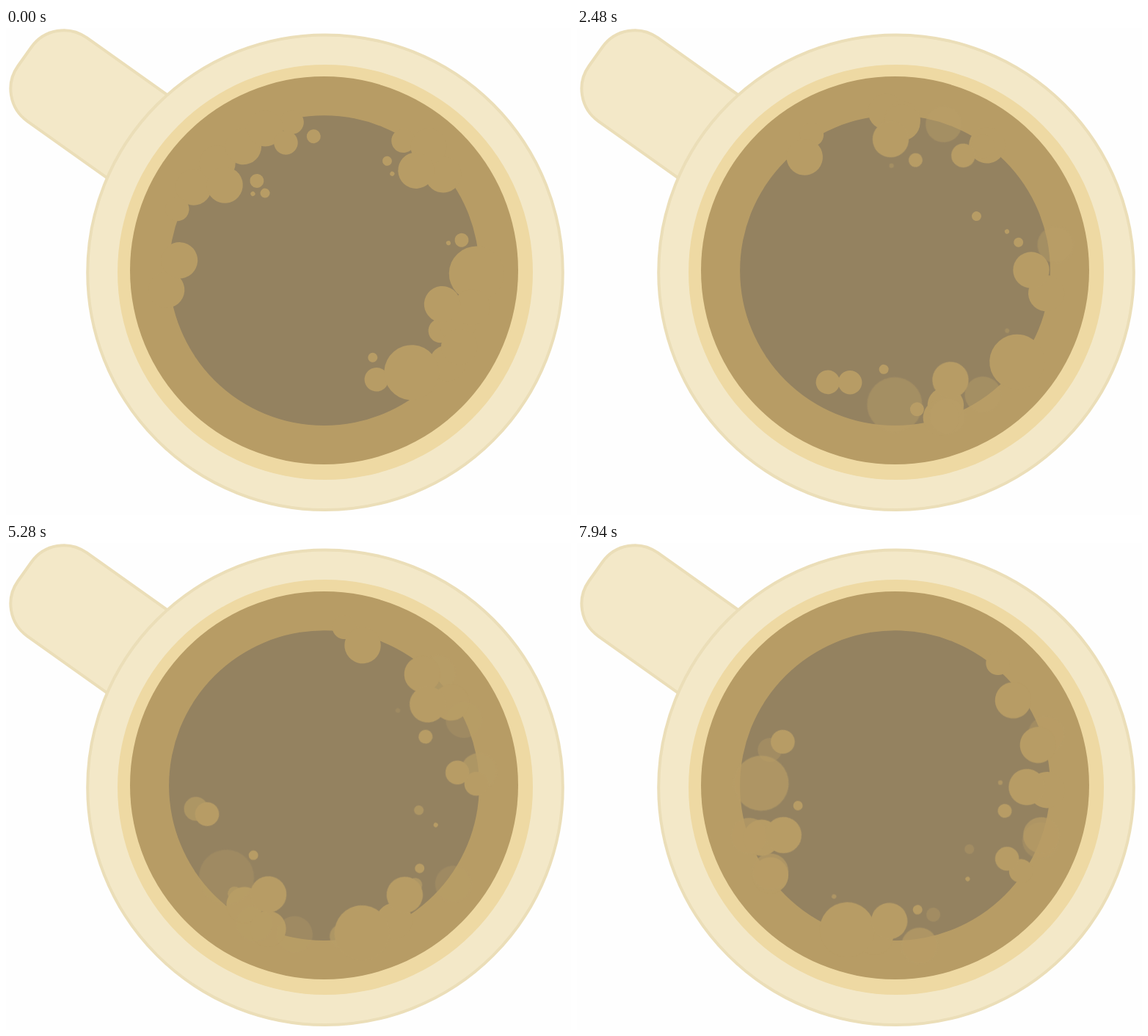
Write an HTML page that moves like this. It is 770 by 664 pixels and loops after 8 s.

```html
<!DOCTYPE html>
<html lang="en">
<head>
<meta charset="utf-8">
<title>Coffee cup</title>
<style>
  html, body { margin: 0; width: 100%; height: 100%; overflow: hidden; background: #fefefe; }
  svg { display: block; width: 770px; height: 664px; }
  .cup { fill: #f3e8c8; stroke: #ebdeb8; stroke-width: 4; }
  .foam { fill: #b79c65; }
</style>
</head>
<body>
<svg viewBox="0 0 770 664">
  <rect class="cup" x="43.3" y="-52.9" width="300" height="139.6" rx="54" transform="rotate(35.4)"/>
  <circle class="cup" cx="435" cy="333.2" r="323.8"/>
  <circle cx="435" cy="333" r="283" fill="#eed9a3"/>
  <circle class="foam" cx="433.5" cy="330.5" r="264.5"/>
  <circle cx="433.5" cy="330.7" r="211.4" fill="#948260"/>
  <g id="bubbles" class="foam" transform="translate(434 330.6)"></g>
</svg>
<script>
const LOOP = 8, FIRST = 0.1, STEP = 0.1478;
const SIZE = { dot: 3.1, bead: 6.5, small: 9.5, medium: 16.3, large: 24.7, huge: 37.5 };

const solid = () => 1;
const fadeOut = t => Math.min(1, 1 - 0.13 * (t - 3.2));
// Drops quickly, then recovers slowly after the low point.
const dip = t => Math.min(1, 0.24 + (t < 3.8 ? 0.12 : 0.0285) * (t - 3.8) ** 2);

// Each swirl turns at speed (degrees per second) until slowAt, then at slowSpeed.
// Bubbles of one size are given as [start angle, orbit].
const swirls = [
  {
    speed: 38, slowAt: 3.21, slowSpeed: 9.8, opacity: fadeOut,
    bead: [[232.5, 133]],
    small: [[265.4, 183.5], [347.5, 191.5]],
    medium: [[301.3, 207], [27.5, 178]],
    large: [[212.5, 211.5], [173, 217]]
  },
  {
    speed: 19.3, slowAt: 6.68, slowSpeed: 6.2, opacity: solid,
    medium: [[257.6, 207], [64.5, 164.7]],
    large: [[321, 208], [225, 206.5], [22, 196]]
  },
  {
    speed: 14.5, slowAt: 4.38, slowSpeed: 12.33, opacity: solid,
    dot: [[305, 161]],
    bead: [[61, 135.7]],
    medium: [[202.6, 217.5]],
    large: [[236.8, 202], [37, 210]],
    huge: [[1.2, 207.3]]
  },
  {
    speed: 16.57, slowAt: LOOP, slowSpeed: 0, opacity: dip,
    dot: [[347.5, 173], [227, 143]],
    large: [[247.4, 210], [14, 207], [310, 221], [29.5, 211]],
    huge: [[49.5, 183]]
  },
  {
    speed: 19.2, slowAt: 5.71, slowSpeed: 13.7, opacity: solid,
    bead: [[299.8, 172]],
    small: [[233, 153]],
    medium: [[253.2, 182]],
    large: [[220.6, 179], [312.5, 185], [16, 167], [184, 198]]
  }
];

function add(parent, name, attrs = {}) {
  const node = document.createElementNS(parent.namespaceURI, name);
  for (const key in attrs) node.setAttribute(key, attrs[key]);
  return parent.appendChild(node);
}

const root = document.getElementById('bubbles');
for (const swirl of swirls) {
  swirl.group = add(root, 'g');
  for (const size in SIZE) {
    for (const [angle, orbit] of swirl[size] || []) {
      add(swirl.group, 'circle', { cx: orbit, r: SIZE[size], transform: `rotate(${angle})` });
    }
  }
}

function draw(seconds) {
  const t = seconds < FIRST ? 0 : FIRST + Math.floor((seconds - FIRST) / STEP) * STEP;
  for (const { group, speed, slowAt, slowSpeed, opacity } of swirls) {
    const angle = speed * Math.min(t, slowAt) + slowSpeed * Math.max(0, t - slowAt);
    group.setAttribute('transform', `rotate(${angle})`);
    group.setAttribute('opacity', opacity(t));
  }
}

const start = performance.now();
function loop() {
  draw((performance.now() - start) / 1000 % LOOP);
  requestAnimationFrame(loop);
}
loop();
</script>
</body>
</html>
```
